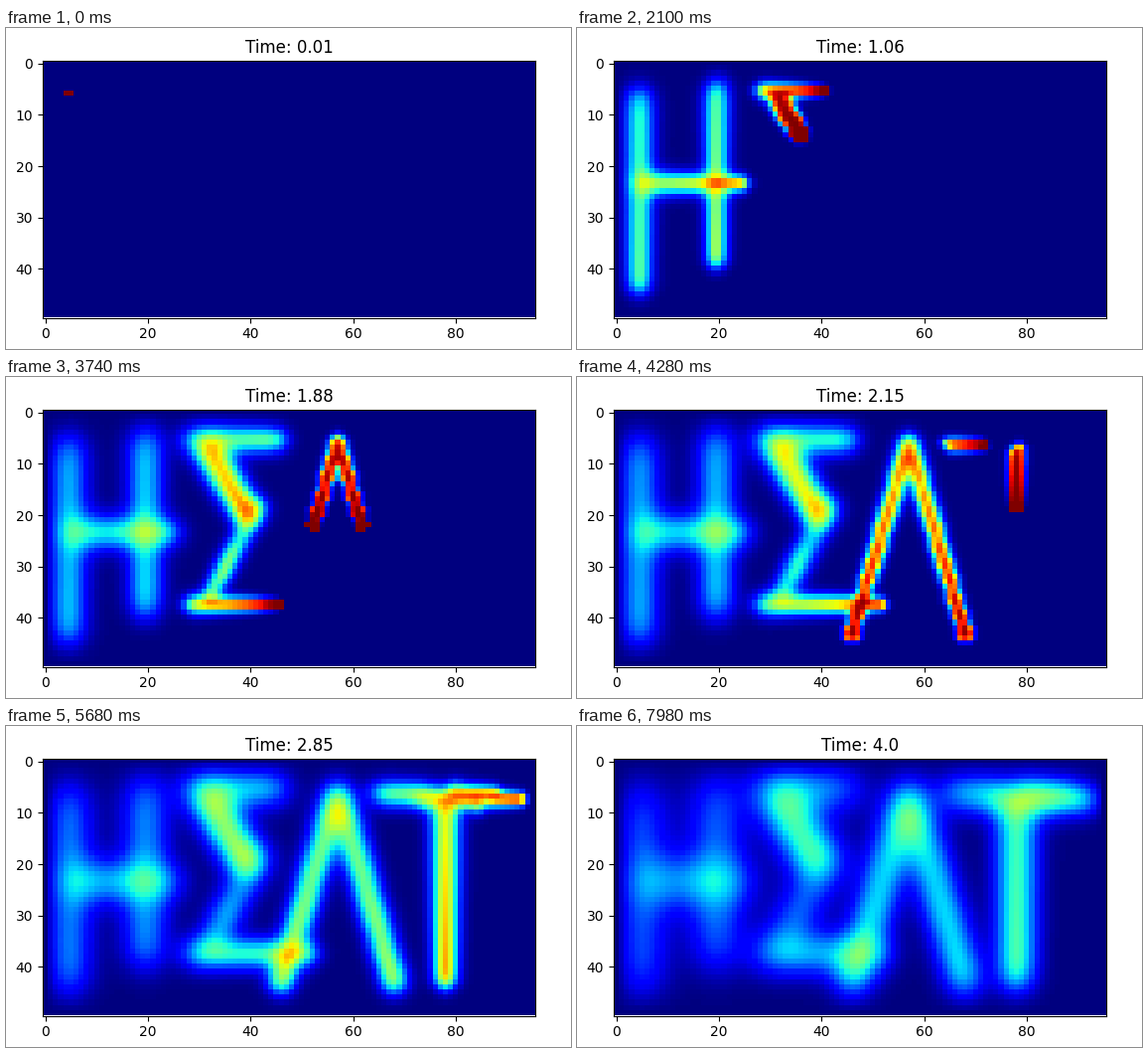
Recreate the animation shown at these times as a matplotlib script. Size 569 px wide and 323 px high, loop 8 s.

```python
import numpy as np
import matplotlib.pyplot as plt
from matplotlib.animation import FuncAnimation

W, H, DPI = 569, 323, 100
NX, NY = 96, 50
FRAMES, DT = 400, 0.01
K = 0.021                # diffusion per step, in cells squared
FAST, SLOW = 105, 42     # pen speeds, in cells per second

rows, cols = np.mgrid[0:NY, 0:NX]


def stroke(start, speed, a, b, r=1.1):
    """A round hot pen moving straight from a to b at constant speed."""
    a, b = np.array(a), np.array(b)
    length = np.hypot(*(b - a))

    def heat(u, t):
        s = (t - start) * speed / length
        if -1e-9 <= s <= 1:
            x, y = a + s * (b - a)
            u[np.hypot(cols - x, rows - y) <= r] = 1

    return heat


def eta():
    yield stroke(0.01, FAST, (4.5, 6), (4.5, 44))
    yield stroke(0.30, FAST, (19.6, 5), (19.1, 39.2))
    yield stroke(0.36, SLOW, (4.3, 23.5), (24.5, 23.5))


def sigma():
    yield stroke(0.77, SLOW, (28.5, 5.5), (46, 5.5))
    yield stroke(0.86, SLOW, (31.5, 7), (40, 21), 1.8)
    yield stroke(1.30, FAST, (41.5, 18.5), (31.4, 37), 0.9)
    yield stroke(1.48, SLOW, (28.3, 37.5), (52, 37.5))


def lamda():
    for side in (-1, 1):
        yield stroke(1.72, FAST, (57, 6), (57 + 11.1 * side, 43.4), 1.3)


def tau():
    yield stroke(2.05, FAST, (78.2, 8), (77.65, 43.6), 1.5)
    yield stroke(1.98, SLOW, (64.8, 6.15), (85, 8))
    yield stroke(2.42, SLOW, (80, 6), (93, 7.8))


def diffuse(u):
    """Explicit heat step; the border cells stay cold."""
    v = np.zeros_like(u)
    c = u[1:-1, 1:-1]
    near = u[2:, 1:-1] + u[:-2, 1:-1] + u[1:-1, 2:] + u[1:-1, :-2]
    v[1:-1, 1:-1] = c + K * (near - 4 * c)
    return v


def simulate():
    strokes = [s for letter in (eta, sigma, lamda, tau) for s in letter()]
    u = np.zeros((NY, NX))
    states = []
    for i in range(FRAMES):
        u = diffuse(u)
        for heat in strokes:
            heat(u, (i + 1) * DT)
        states.append(u.copy())
    return states


states = simulate()

fig = plt.figure(figsize=(W / DPI, H / DPI), dpi=DPI)
ax = fig.add_axes([37 / W, 31.5 / H, 496 / W, 258.33 / H])
im = ax.imshow(states[0], cmap="jet", vmin=0, vmax=1, aspect="auto")
title = ax.set_title("")


def update(i):
    im.set_data(states[i])
    title.set_text(f"Time: {round((i + 1) * DT, 2)}")
    return im, title


anim = FuncAnimation(fig, update, frames=FRAMES, interval=1000 * DT * 2,
                     repeat=True, repeat_delay=0)
plt.show()
```
